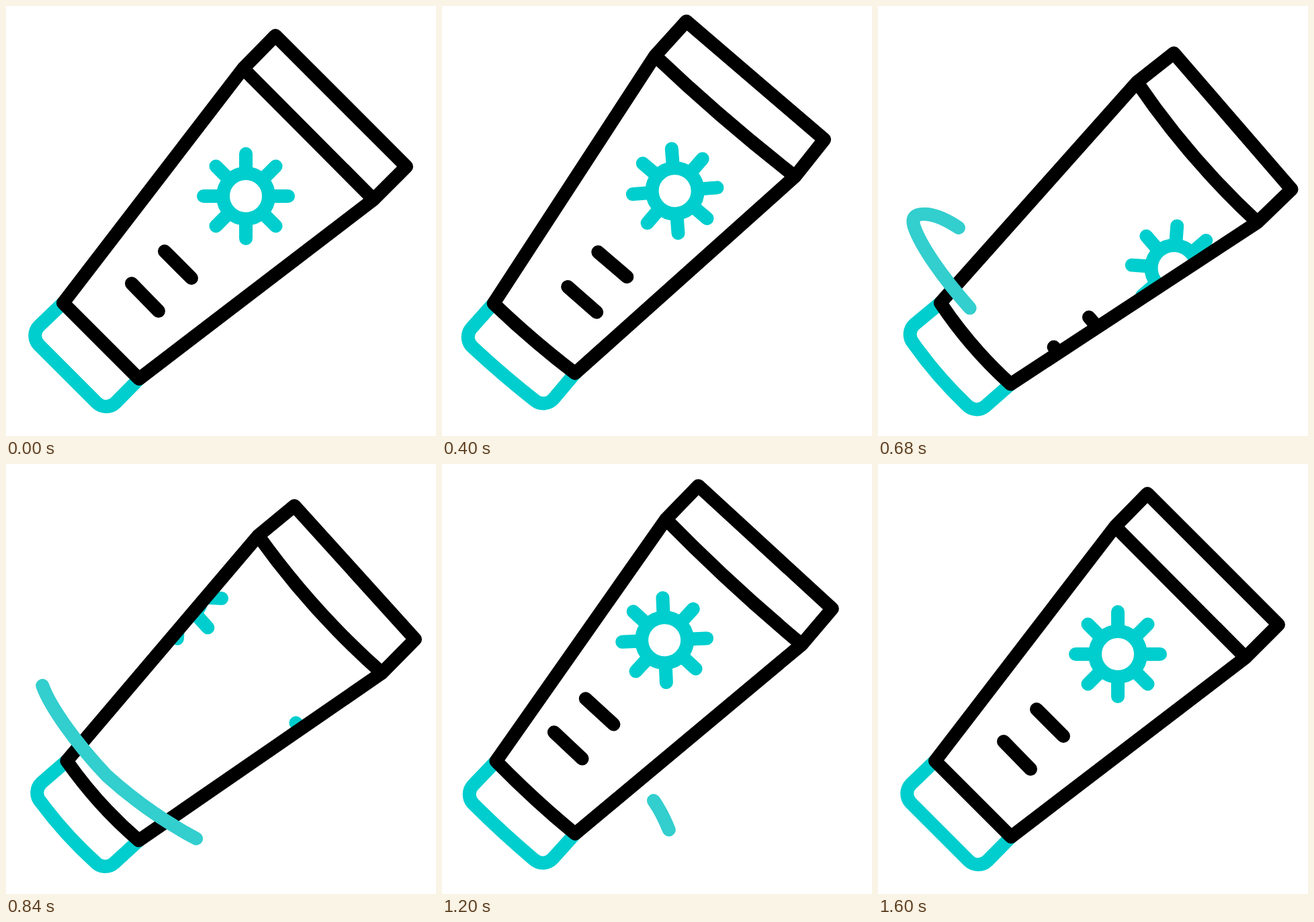
An HTML page for the animation above (2.04 s loop, 640x640 px).

```html
<!DOCTYPE html>
<html lang="en">
<head>
<meta charset="utf-8">
<title>Sun cream tube</title>
<style>
  html, body { margin: 0; width: 100%; height: 100%; overflow: hidden; background: #fff; }
  svg { display: block; width: 100vw; height: 100vh; }
  path, circle { fill: none; stroke-width: 20; stroke-linecap: round; stroke-linejoin: round; }
  .ink { stroke: #000; }
  .teal { stroke: #00cece; }
  .swoosh { stroke: #33cece; }
</style>
</head>
<body>
<svg viewBox="0 0 640 640">
  <defs>
    <clipPath id="body"><polygon points="353,93 547,288 198,555 85,442"/></clipPath>
  </defs>
  <g id="tube">
    <path id="cap" class="teal"/>
    <g clip-path="url(#body)">
      <g class="label">
        <circle class="teal" cx="357" cy="283" r="34"/>
        <path id="rays" class="teal"/>
        <path class="ink" d="M236 365L276 405M187 413L227 454"/>
      </g>
    </g>
    <path id="shell" class="ink"/>
  </g>
  <path id="swoosh" class="swoosh" pathLength="1" d="M120 330C105 320 90 312 74 310C56 308 49 314 54 329C64 358 100 411 150 464C190 500 240 535 286 559C305 567 322 570 332 569C348 566 342 552 338 545C332 530 324 514 315 501"/>
</svg>
<script>
const LOOP = 2040, STEP = 40, WRAP = 319;
const get = id => document.getElementById(id);
const clamp = x => Math.min(1, Math.max(0, x));
const tube = get('tube'), cap = get('cap'), shell = get('shell'), swoosh = get('swoosh');

get('rays').setAttribute('d', Array.from({ length: 8 }, (_, i) => {
  const c = Math.cos(i * Math.PI / 4), s = Math.sin(i * Math.PI / 4);
  return `M${357 + 40 * c} ${283 + 40 * s}L${357 + 63 * c} ${283 + 63 * s}`;
}).join(''));

const label = document.querySelector('.label');
const twin = label.cloneNode(true);
label.after(twin);

// Monotone cubic curve through [time, value] keys, flat at both ends
function curve(keys) {
  const slope = i => (keys[i + 1][1] - keys[i][1]) / (keys[i + 1][0] - keys[i][0]);
  const tangent = keys.map((_, i) => {
    if (i === 0 || i === keys.length - 1) return 0;
    const a = slope(i - 1), b = slope(i);
    return a * b <= 0 ? 0 : 2 * a * b / (a + b);
  });
  return t => {
    const last = keys.length - 1;
    if (t >= keys[last][0]) return keys[last][1];
    let i = 0;
    while (t >= keys[i + 1][0]) i++;
    const [t0, v0] = keys[i], [t1, v1] = keys[i + 1];
    const h = t1 - t0, p = (t - t0) / h, q = 1 - p;
    return v0 * (1 + 2 * p) * q * q + v1 * p * p * (3 - 2 * p)
      + h * p * q * (tangent[i] * q - tangent[i + 1] * p);
  };
}

const tilt = curve([[0, 0], [240, -3.25], [380, -4.5], [520, -1.9], [720, 4.7],
  [840, 2.85], [1040, -2.7], [1100, -2.95], [1200, -2.45], [1600, 0]]);
const slide = curve([[0, 0], [240, -14.5], [520, 55], [840, 170],
  [1040, 259], [1200, 302], [1600, WRAP]]);

// Arc from a to b bulging towards the cap by `depth`
function bow(a, b, depth) {
  const k = depth * Math.SQRT2;
  return `Q${(a[0] + b[0]) / 2 - k} ${(a[1] + b[1]) / 2 + k} ${b}`;
}

// The label runs around the tube, dipping towards the cap at the sides
function placeLabel(node, across, bend) {
  const along = 0.015 * across - 4.7 * bend * bend - 9.2 * (across / 150) ** 2;
  const x = (across + along) * Math.SQRT1_2, y = (across - along) * Math.SQRT1_2;
  node.setAttribute('transform', `translate(${x} ${y})`);
}

function draw(t) {
  const bend = Math.min(clamp(t / 600), clamp((1600 - t) / 600));
  const bulge = bend * bend;
  tube.setAttribute('transform', `rotate(${tilt(t)} 90 550)`);

  const inset = 2.8 * bend, rise = 0.8 * bend;
  const a = [353, 93], b = [547, 288], l = [85, 442], r = [198, 555];
  const top = [401 + inset + rise, 44 + inset - rise];
  const right = [596 - inset + rise, 239 - inset - rise];
  shell.setAttribute('d', `M${r}L${b}L${right}L${top}L${a}L${l}${bow(l, r, 5 * bulge)}Z`
    + `M${a}${bow(a, b, 7.8 * bulge)}`);

  const c = [49, 504.5], d = [135, 590.5];
  cap.setAttribute('d', `M${l}L49 476.5A20 20 0 0 0 ${c}${bow(c, d, 3 * bulge)}`
    + `A20 20 0 0 0 163 590.5L${r}`);

  const s = slide(t);
  placeLabel(label, s, bend);
  placeLabel(twin, s - WRAP, bend);

  const head = clamp((t - 475) / 480), tail = clamp((t - 763) / 480);
  swoosh.style.display = head > tail ? '' : 'none';
  swoosh.setAttribute('stroke-dasharray', `${head - tail} 2`);
  swoosh.setAttribute('stroke-dashoffset', -tail);
}

const start = performance.now();
function tick() {
  const t = (performance.now() - start) % LOOP;
  draw(Math.floor(t / STEP) * STEP);
  requestAnimationFrame(tick);
}
tick();
</script>
</body>
</html>
```
